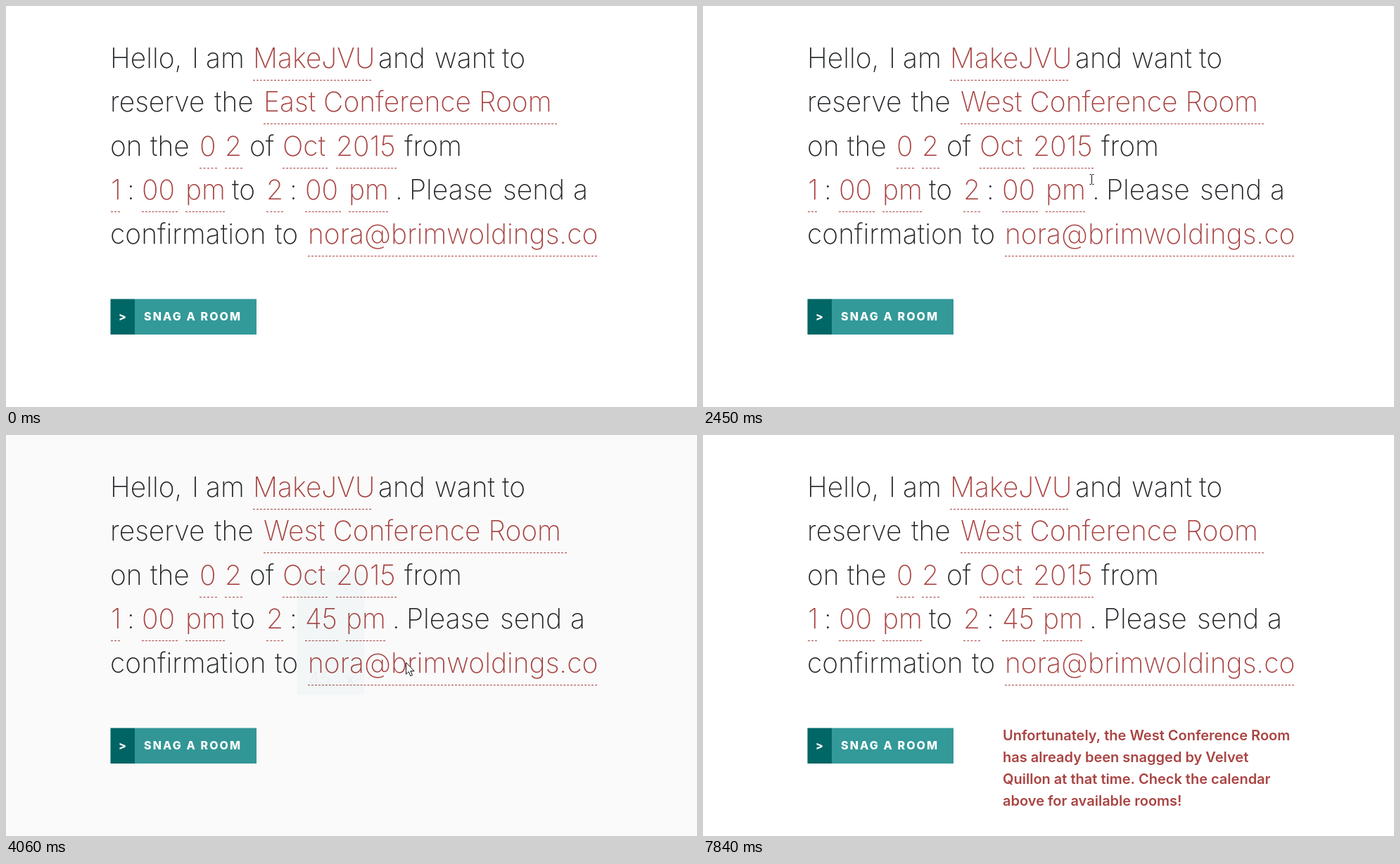
Write an HTML page with a canvas that moves like this. It is 982x570 px and loops after 7.91 s.

```html
<!DOCTYPE html>
<html lang="en">
<head>
<meta charset="utf-8">
<title>Room booking form</title>
<style>
  html, body { margin: 0; width: 100%; height: 100%; overflow: hidden; background: #fff; }
  canvas { display: block; width: 982px; height: 570px; }
</style>
</head>
<body>
<canvas id="stage" width="982" height="570"></canvas>
<script>
const ctx = document.getElementById('stage').getContext('2d');
const LOOP = 7910, TICK = 70;
const INK = '#25282b', RED = '#a94442', RED_HOVER = '#873230', TEAL = '#339999', DARK_TEAL = '#006666';
const font = (weight, size) => `${weight} ${size}px Inter, sans-serif`;

const PICK_ROOM = 1940, PICK_MINUTE = 3832;
const popups = [
  { open: 1073, close: PICK_ROOM, left: 350, width: 484.5, middle: 138, before: 1, after: 0,
    rows: ['West Conference Room', 'East Conference Room', 'Millbrit Oak Education Room'] },
  { open: 2970, close: PICK_MINUTE, left: 408.5, width: 106, middle: 263, before: 0, after: 3,
    rows: ['00', '15', '30', '45'] }
];
const ROW = 48.5;

// time, x, y, pointer shape until the next stop
const pointerPath = [
  [560, 974, 214, 'arrow'], [770, 790, 150, 'hand'], [910, 725, 133, 'hand'],
  [1190, 725, 133, 'hand'], [1610, 653, 105, 'hand'], [1680, 653, 105, 'hand'],
  [1750, 651, 93, 'hand'], [1930, 651, 93, 'arrow'], [2240, 588, 190, 'beam'],
  [2450, 552, 246, 'beam'], [2520, 552, 246, 'beam'], [2660, 500, 255, 'hand'],
  [2800, 459, 263, 'hand'], [3220, 459, 263, 'hand'], [3780, 452, 330, 'hand'],
  [3830, 452, 330, 'arrow'], [4060, 568, 323, 'arrow'], [4130, 568, 323, 'hand'],
  [4270, 568, 323, 'hand'], [4480, 480, 370, 'arrow'], [4700, 340, 438, 'hand'],
  [4900, 300, 442, 'hand'], [5300, 300, 442, 'hand'], [5600, 358, 440, 'arrow'],
  [5880, 406, 438, 'arrow'], [6300, 406, 438, 'arrow'], [7070, 936, 567, 'arrow'],
  [7110, 936, 572, 'arrow']
];

const clamp = v => Math.max(0, Math.min(1, v));

// cubic-bezier(.25, .1, .25, 1)
function ease(x) {
  x = clamp(x);
  if (x === 0 || x === 1) return x;
  let lo = 0, hi = 1;
  const curve = (u, a, b) => 3 * u * (1 - u) ** 2 * a + 3 * u * u * (1 - u) * b + u ** 3;
  for (let i = 0; i < 20; i++) {
    const mid = (lo + hi) / 2;
    if (curve(mid, .25, .25) < x) lo = mid; else hi = mid;
  }
  return curve(lo, .1, 1);
}

function pointerAt(t) {
  for (let i = 1; i < pointerPath.length; i++) {
    const a = pointerPath[i - 1], b = pointerPath[i];
    if (t >= a[0] && t < b[0]) {
      const k = (t - a[0]) / (b[0] - a[0]);
      return { x: a[1] + (b[1] - a[1]) * k, y: a[2] + (b[2] - a[2]) * k, shape: a[3] };
    }
  }
  return null;
}

function write(text, x, y, face, color, spacing = 0) {
  ctx.font = face;
  ctx.letterSpacing = spacing + 'px';
  ctx.fillStyle = color;
  ctx.fillText(text, x, y);
}

const ruleY = line => Math.round(104.6 + 62.55 * line);

function big(text, x, line, color) {
  write(text, x, ruleY(line) - 17, font(250, 39), color);
}

function words(line, list) {
  list.forEach(([text, x]) => big(text, x, line, INK));
}

// 3px dashes with gaps of about 2px, ending on a full dash
function dashedRule(left, right, y) {
  const count = Math.round((right - left + 2) / 5);
  const step = (right - left - 3) / (count - 1);
  ctx.fillStyle = RED;
  for (let i = 0; i < count; i++) ctx.fillRect(left + i * step, y, 3, 1);
}

function field(text, left, right, line, pointer) {
  const y = ruleY(line);
  const hovered = pointer && pointer.x >= left && pointer.x <= right && pointer.y > y - 52 && pointer.y < y;
  big(text, left, line, hovered ? RED_HOVER : RED);
  dashedRule(left, right, y);
}

function drawForm(t, pointer) {
  const west = t >= PICK_ROOM, late = t >= PICK_MINUTE, shift = late ? -4 : 0;
  const red = (text, left, right, line) => field(text, left, right, line, pointer);

  words(0, [['Hello,', 148], ['I', 264], ['am', 284], ['and', 529], ['want', 609], ['to', 705]]);
  red('MakeJVU', 351, 519, 0);

  words(1, [['reserve', 148], ['the', 296]]);
  red(west ? 'West Conference Room' : 'East Conference Room', 366, west ? 797 : 783, 1);

  words(2, [['on', 148], ['the', 205], ['of', 346], ['from', 566]]);
  red('0', 275, 300, 2);
  red('2', 311, 336, 2);
  red('Oct', 393, 457, 2);
  red('2015', 469, 555, 2);

  words(3, [[':', 172], ['to', 321], [':', 403], ['.', 553 + shift],
    ['Please', 573 + shift], ['send', 706 + shift], ['a', 806 + shift]]);
  red('1', 149, 162, 3);
  red('00', 193, 244, 3);
  red('pm', 255, 311, 3);
  red('2', 370, 394, 3);
  red(late ? '45' : '00', 425, late ? 472 : 476, 3);
  red('pm', 487 + shift, 543 + shift, 3);

  words(4, [['confirmation', 148], ['to', 382]]);
  red('nora@brimwoldings.co', 429, 840, 4);
}

function drawButton(t) {
  ctx.fillStyle = TEAL;
  ctx.fillRect(183, 416.5, 173, 50.5);
  ctx.fillStyle = DARK_TEAL;
  ctx.fillRect(148.5, 416.5, 34.5, 50.5);
  write('>', 160, 447, font(800, 16), '#fff');
  write('SNAG A ROOM', 196, 447, font(800, 16), '#fff', 2.1);
  if (t >= 4900 && t < 7840) {
    ctx.strokeStyle = '#4a98d8';
    ctx.lineWidth = 1;
    ctx.strokeRect(148.5, 416.5, 208, 51);
  }
}

function drawNotice(t) {
  ctx.globalAlpha = 1 - ease((t - 6300) / 420);
  ctx.fillStyle = '#c4605a';
  ctx.fillRect(0, 381, 982 * ease((t - 5000) / 930), 3);
  ctx.globalAlpha = ease((t - 5250) / 680);
  ['Unfortunately, the West Conference Room',
   'has already been snagged by Velvet',
   'Quillon at that time. Check the calendar',
   'above for available rooms!'].forEach((text, i) =>
    write(text, 426, 434 + 31 * i, font(600, 20), RED));
  ctx.globalAlpha = 1;
}

const openness = (popup, t) =>
  t < popup.close ? ease((t - popup.open) / 300) : 1 - ease((t - popup.close) / 300);

function drawPopup(popup, t, pointer) {
  const p = openness(popup, t);
  if (p <= 0) return;
  ctx.fillStyle = `rgba(0,0,0,${.5 * p})`;
  ctx.fillRect(0, 0, 982, 570);

  const height = ROW * popup.rows.length, scale = .9 + .1 * p;
  const centerX = popup.left + popup.width / 2;
  const centerY = popup.middle + height * .1 * (1 - p);
  const checked = t < popup.close ? popup.before : popup.after;
  const localX = pointer ? (pointer.x - centerX) / scale + popup.width / 2 : -1;
  const localY = pointer ? (pointer.y - centerY) / scale + height / 2 : -1;

  ctx.save();
  ctx.globalAlpha = p;
  ctx.translate(centerX, centerY);
  ctx.scale(scale, scale);
  ctx.translate(-popup.width / 2, -height / 2);
  ctx.fillStyle = TEAL;
  ctx.fillRect(0, 0, popup.width, height);
  popup.rows.forEach((text, i) => {
    const y = ROW * i;
    if (localX >= 0 && localX <= popup.width && Math.floor(localY / ROW) === i) {
      ctx.fillStyle = 'rgba(0,0,0,.05)';
      ctx.fillRect(0, y, popup.width, ROW);
    }
    write(text, 16.5, y + 35, font(300, 31), i === checked ? 'rgba(20,45,45,.75)' : '#fff');
    if (i === checked)
      write('x', popup.width - 28, y + 31, font(600, 21), 'rgba(20,45,45,.9)');
  });
  ctx.restore();
}

const pointerShapes = {
  arrow: 'M0 0V16.5L3.8 13L6.4 19L9 17.9L6.4 12H11.6Z',
  hand: 'M0 1.5C0 -.5 3 -.5 3 1.5V7C4 6 6 6.4 6 7.8C7.2 7 9 7.4 9 9C10.4 8.2 12 9 12 10.5V15'
    + 'C12 17 10.5 18 10.5 20.5H2C2 18 -1 16 -3.5 12.5C-5.5 10 -3 8.8 -1.5 10.2L0 11.8Z',
  beam: 'M-3 -7H-1L0 -6L1 -7H3M0 -6V6M-3 7H-1L0 6L1 7H3'
};
for (const name in pointerShapes) pointerShapes[name] = new Path2D(pointerShapes[name]);

function drawPointer({ x, y, shape }) {
  ctx.save();
  ctx.translate(Math.round(x) + .5, Math.round(y) + .5);
  ctx.lineWidth = 1;
  ctx.lineJoin = 'round';
  ctx.strokeStyle = '#111';
  ctx.fillStyle = '#fff';
  if (shape !== 'beam') ctx.fill(pointerShapes[shape]);
  ctx.stroke(pointerShapes[shape]);
  if (shape === 'hand') {
    ctx.beginPath();
    for (const gap of [3, 6, 9]) {
      ctx.moveTo(gap, 7.5);
      ctx.lineTo(gap, 11);
    }
    ctx.stroke();
  }
  ctx.restore();
}

function draw(t) {
  const pointer = pointerAt(t);
  const covered = popups.some(popup => openness(popup, t) > 0);
  ctx.fillStyle = '#fff';
  ctx.fillRect(0, 0, 982, 570);
  drawForm(t, covered ? null : pointer);
  drawButton(t);
  drawNotice(t);
  popups.forEach(popup => drawPopup(popup, t, pointer));
  if (pointer) drawPointer(pointer);
}

const start = performance.now();
function frame() {
  const elapsed = (performance.now() - start) % LOOP;
  draw(Math.floor(elapsed / TICK) * TICK);
  requestAnimationFrame(frame);
}
frame();
</script>
</body>
</html>
```
